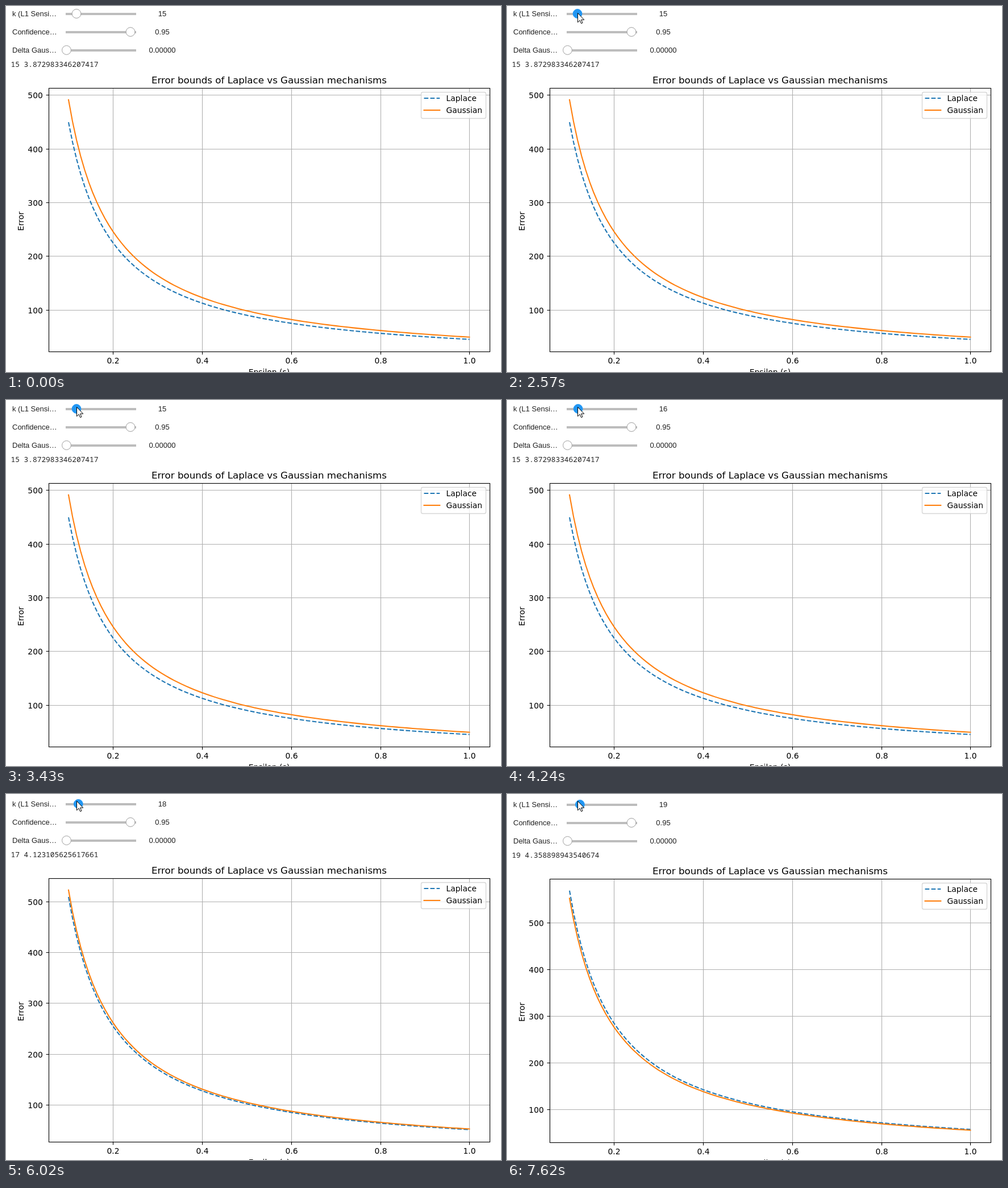
These frames come from a looping animation (871 px wide and 643 px high, 8 s). An HTML page:

```html
<!DOCTYPE html>
<html lang="en">
<head>
<meta charset="utf-8">
<title>Error bounds</title>
<style>
  html, body { margin: 0; width: 100%; height: 100%; overflow: hidden; background: #fff; }
  svg { display: block; width: 871px; height: 643px; }
  .ui { font: 13px "Liberation Sans", Arial, sans-serif; fill: #222; }
  .log { font: 12.83px "Noto Sans Mono", "DejaVu Sans Mono", monospace; fill: #222; white-space: pre; }
  .plot { font: 13.89px "DejaVu Sans", sans-serif; }
  .plot .title { font-size: 16.67px; }
  .mid { text-anchor: middle; }
  .end { text-anchor: end; }
  .grid { stroke: #b0b0b0; stroke-width: 1.11; fill: none; }
  .axis { stroke: #000; stroke-width: 1.11; fill: none; }
  .curve { fill: none; stroke-width: 2.08; stroke-linejoin: round; }
  .lap { stroke: #1f77b4; stroke-dasharray: 7.71 3.33; }
  .gau { stroke: #ff7f0e; stroke-linecap: square; }
  .knob { fill: #fff; stroke: #9e9e9e; }
</style>
</head>
<body>
<svg viewBox="0 0 871 643" id="stage"></svg>
<script>
const LOOP = 8000;
const TOP = 143.7, HEIGHT = 463, X0 = 110, X_UNIT = 783.75;
const LAPLACE = Math.log(20), GAUSS = 12.68;

// time, slider value, plotted value, page offset
const states = [
  [0, 15, 15, 0],
  [2350, 14, 15, 0],
  [2490, 15, 15, 0],
  [3030, 15, 14, 1],
  [3430, 15, 15, 2],
  [4240, 16, 15, 2],
  [4630, 16, 16, 3],
  [5030, 17, 16, 3],
  [5430, 17, 17, 4],
  [6020, 18, 17, 4],
  [6480, 18, 18, 4],
  [7030, 19, 18, 4],
  [7620, 19, 19, 5]
];
const HOVER = 2140, PRESS = 2280, RELEASE = 2570;

const svg = document.getElementById('stage');

function add(parent, tag, attrs = {}, text) {
  const el = document.createElementNS('http://www.w3.org/2000/svg', tag);
  for (const name in attrs) el.setAttribute(name, attrs[name]);
  if (text !== undefined) el.textContent = text;
  parent.append(el);
  return el;
}
const label = (parent, x, y, cls, text) => add(parent, 'text', { x, y, class: cls }, text);
const set = (el, attrs) => { for (const name in attrs) el.setAttribute(name, attrs[name]); };
const px = v => Math.round(v) + 0.5;
const xAt = eps => X0 + X_UNIT * (eps - 0.1);
const knobAt = k => 124 + 1.1 * (k - 15);

const page = add(svg, 'g');

function slider(y, name, knobX, value) {
  const row = add(page, 'g', { class: 'ui' });
  label(row, 11, y + 4, '', name);
  add(row, 'rect', { x: 105, y: y - 1.5, width: 124, height: 4, fill: '#bdbdbd' });
  return {
    knob: add(row, 'circle', { cx: knobX, cy: y, r: 7.9, class: 'knob' }),
    value: label(row, 275, y + 4, 'mid', value)
  };
}
const main = slider(13.5, 'k (L1 Sensi…', knobAt(15), '15');
slider(45.5, 'Confidence…', 219, '0.95');
slider(77.5, 'Delta Gaus…', 106.5, '0.00000');
const log = label(page, 8.5, 107, 'log', '');

const plot = add(page, 'g', { class: 'plot' });
label(plot, 463, 135.5, 'title mid', 'Error bounds of Laplace vs Gaussian mechanisms');
label(plot, 463, 647.5, 'mid', 'Epsilon (ε)');
add(plot, 'text', { transform: 'translate(30.5 378) rotate(-90)', class: 'mid' }, 'Error');

for (let i = 1; i <= 5; i++) {
  const x = px(xAt(i * 0.2));
  add(plot, 'path', { d: `M${x} 144.5V607.5`, class: 'grid' });
  add(plot, 'path', { d: `M${x} 607.5v4.9`, class: 'axis' });
  label(plot, x, 628, 'mid', (i * 0.2).toFixed(1));
}

const ticks = [];
for (let v = 100; v <= 500; v += 100) {
  const g = add(plot, 'g');
  add(g, 'path', { d: 'M75.5 0H851.5', class: 'grid' });
  add(g, 'path', { d: 'M75.5 0h-4.9', class: 'axis' });
  label(g, 64.8, 5.3, 'end', v);
  ticks.push({ v, g });
}

const lapLine = add(plot, 'path', { class: 'curve lap' });
const gauLine = add(plot, 'path', { class: 'curve gau' });
add(plot, 'rect', { x: 75.5, y: 144.5, width: 776, height: 463, class: 'axis' });

add(plot, 'rect', {
  x: 730.5, y: 151.5, width: 114, height: 46, rx: 2.8,
  fill: '#fff', 'fill-opacity': 0.8, stroke: '#ccc', 'stroke-opacity': 0.8, 'stroke-width': 1.39
});
add(plot, 'path', { d: 'M735.5 162h27.8', class: 'curve lap' });
add(plot, 'path', { d: 'M735.5 183h27.8', class: 'curve gau' });
label(plot, 774.5, 167.3, '', 'Laplace');
label(plot, 774.5, 188.3, '', 'Gaussian');

const cursor = add(svg, 'path', {
  d: 'M0 0V16.2L3.7 12.7L6.1 18.2L8.5 17.1L6.1 11.7H11.2Z',
  fill: '#fff', stroke: '#000', 'stroke-linejoin': 'round'
});

function curve(scale, yAt) {
  let d = '';
  for (let i = 0; i < 100; i++) {
    const eps = 0.1 + 0.9 * i / 99;
    d += (i ? 'L' : 'M') + xAt(eps).toFixed(2) + ' ' + yAt(scale / eps).toFixed(2);
  }
  return d;
}

function drawPlot(k) {
  const lap = k * LAPLACE, gau = Math.sqrt(k) * GAUSS;
  const low = Math.min(lap, gau), high = 10 * Math.max(lap, gau);
  const unit = HEIGHT / (1.1 * (high - low));
  const yAt = v => TOP + HEIGHT / 22 + (high - v) * unit;
  set(lapLine, { d: curve(lap, yAt) });
  set(gauLine, { d: curve(gau, yAt) });
  for (const { v, g } of ticks) {
    const y = yAt(v);
    set(g, { transform: `translate(0 ${px(y)})`, visibility: y < TOP ? 'hidden' : 'visible' });
  }
  const root = Math.sqrt(k);
  log.textContent = k + ' ' + (Number.isInteger(root) ? root.toFixed(1) : root);
}

const mix = (a, b, u) => a.map((v, i) => v + (b[i] - v) * u);
const easeOut = u => 1 - (1 - u) * (1 - u);

// The pointer is sampled in discrete steps.
function pointer(t) {
  const entry = [764, 620], rest = [360, 71], pass = [131.5, 32], goal = [124.5, 12.5];
  if (t < 1250) return null;
  if (t < 1720) {
    const step = Math.min(3, Math.floor((t - 1250) / 66.6));
    return mix(entry, rest, easeOut(step / 3));
  }
  const step = Math.floor((t - 1720) / 70) + 1;
  if (step <= 3) return mix(rest, pass, easeOut(step / 3));
  return mix(pass, goal, easeOut(Math.min(1, (step - 3) / 5)));
}

let shown = 0;

function render(t) {
  const [, value, k, dy] = states.filter(s => s[0] <= t).pop();
  if (k !== shown) drawPlot(shown = k);
  set(page, { transform: `translate(0 ${dy})` });

  const pressed = t >= PRESS && t < RELEASE;
  main.value.textContent = value;
  set(main.knob, {
    cx: knobAt(value),
    r: pressed ? 10.2 : 7.9,
    style: t >= HOVER ? 'fill:#2196f3;stroke:#2196f3' : ''
  });

  const p = pointer(t);
  set(cursor, p
    ? { visibility: 'visible', transform: `translate(${px(p[0] - 0.5)} ${px(p[1] - 0.5)})` }
    : { visibility: 'hidden' });
}

const start = performance.now();
function tick(now) {
  render(Math.max(0, now - start) % LOOP);
  requestAnimationFrame(tick);
}
render(0);
requestAnimationFrame(tick);
</script>
</body>
</html>
```
